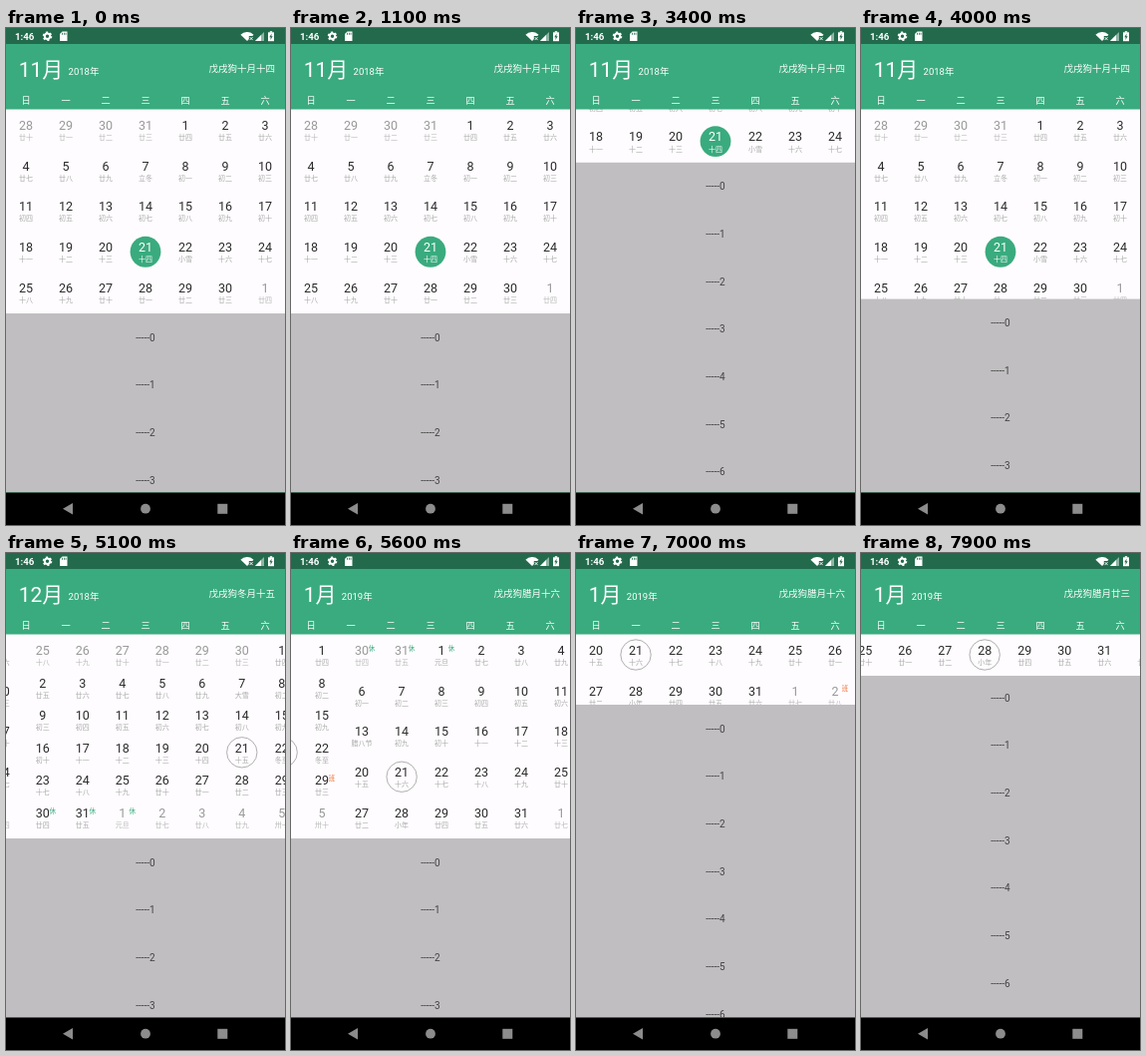
An HTML page with a canvas for the animation above (8000 ms loop, 280 px wide and 498 px high).

```html
<!DOCTYPE html>
<html lang="zh-CN">
<head>
<meta charset="utf-8">
<title>日历</title>
<style>
html, body { margin: 0; width: 100%; height: 100%; overflow: hidden; background: #000; }
canvas { display: block; width: 280px; height: 498px; }
</style>
</head>
<body>
<canvas id="stage"></canvas>
<script>
const W = 280, H = 498, LOOP = 8000, STEP = 100, DAY = 864e5;
const GREEN = '#3aab7e', TOP = 81.5, ROW = 97.4, PITCH = 40.75, FOLD = 4 * PITCH, END = 465;
const FONT = 'Roboto, "Noto Sans CJK SC", "Noto Sans CJK", sans-serif';
const canvas = document.getElementById('stage');
const c = canvas.getContext('2d');
const dpr = window.devicePixelRatio || 1;
canvas.width = W * dpr;
canvas.height = H * dpr;

// Days are counted from Sunday, 28 October 2018.
const EPOCH = Date.UTC(2018, 9, 28);
const TODAY = 24;
const LUNAR = [[70, '腊月'], [40, '冬月'], [11, '十月'], [-19, '九月']];
const FEASTS = { 10: '立冬', 25: '小雪', 40: '大雪', 55: '冬至', 65: '元旦', 77: '腊八节', 92: '小年' };
const MARKS = { 62: '班', 63: '休', 64: '休', 65: '休', 97: '班' };

function monthPage(i) {
  const date = new Date(Date.UTC(2018, 10 + i, 1));
  const start = (date - EPOCH) / DAY;
  const days = (Date.UTC(2018, 11 + i, 1) - date) / DAY;
  const month = date.getUTCMonth();
  return {
    month,
    title: month + 1 + '月',
    year: date.getUTCFullYear() + '年',
    first: start - start % 7,
    rows: Math.ceil((start % 7 + days) / 7),
    pick: start + 20
  };
}
const MONTHS = [0, 1, 2].map(monthPage);

// Progress from 0 to 1 between two times
const part = (t, a, b) => Math.min(1, Math.max(0, (t - a) / (b - a)));
const out = (t, a, b) => 1 - (1 - part(t, a, b)) ** 2;
const smooth = (t, a, b) => { const u = part(t, a, b); return u * u * (3 - 2 * u); };

function pose(t) {
  const rest = 71.5;
  return {
    fold: FOLD * (out(t, 1600, 2700) - smooth(t, 3250, 4170))
      + rest * out(t, 6100, 6400) + (FOLD - rest) * smooth(t, 6500, 7300),
    scroll: 26 * (out(t, 2800, 3100) - part(t, 3300, 3400)) + 2 * part(t, 7200, 7300),
    page: W * (smooth(t, 4700, 5170) + smooth(t, 5200, 5750)),
    week: W * smooth(t, 7600, 8035),
    opening: t > 2800 && t < 4500
  };
}

function rect(x, y, w, h, color) {
  c.fillStyle = color;
  c.fillRect(x, y, w, h);
}

function poly(color, ...pts) {
  c.fillStyle = color;
  c.beginPath();
  pts.forEach(p => c.lineTo(...p));
  c.fill();
}

function disc(x, y, r, color) {
  c.fillStyle = color;
  c.beginPath();
  c.arc(x, y, r, 0, 7);
  c.fill();
}

function ring(x, y, r, width, color) {
  c.strokeStyle = color;
  c.lineWidth = width;
  c.beginPath();
  c.arc(x, y, r, 0, 2 * Math.PI);
  c.stroke();
}

// Text centred vertically on y; returns its width.
function text(s, x, y, size, color, align = 'center', weight = 400) {
  c.font = `${weight} ${size}px ${FONT}`;
  c.textAlign = align;
  c.fillStyle = color;
  c.fillText(s, x, y + size * 0.36);
  return c.measureText(s).width;
}

function lunar(n) {
  const [start, month] = LUNAR.find(l => n >= l[0]);
  const d = n - start + 1;
  const day = (d < 11 ? '初' : '初十廿卅'[Math.floor(d / 10)]) + '十一二三四五六七八九'[d % 10];
  return { month, day };
}

function drawDay(n, x, y, month, pick) {
  const date = new Date(EPOCH + n * DAY);
  const own = date.getUTCMonth() === month;
  const solid = n === pick && n === TODAY;
  if (solid) disc(x, y + 4.6, 15.4, GREEN);
  else if (n === pick) ring(x, y + 4.6, 15.2, 0.9, '#a8a8a8');
  text(date.getUTCDate(), x, y, 12.5, solid ? '#fff' : own ? '#2b2b2b' : '#999');
  text(FEASTS[n] || lunar(n).day, x, y + 12, 7, solid ? '#fff' : own ? '#aaa' : '#b8b8b8');
  const mark = MARKS[n];
  if (mark) text(mark, x + 9.9, y - 2, 6.5, mark === '休' ? GREEN : '#f0763c');
}

function drawWeek(first, x, y, month, pick) {
  for (let i = 0; i < 7; i++) drawDay(first + i, x + 20 + i * 40, y, month, pick);
}

function drawMonth(m, x, shift) {
  for (let r = 0; r < m.rows; r++)
    drawWeek(m.first + r * 7, x, ROW + r * FOLD / (m.rows - 1) - shift, m.month, m.pick);
}

function drawList(top, scroll) {
  c.save();
  c.beginPath();
  c.rect(0, top, W, END - top);
  c.clip();
  rect(0, top, W, H, '#c0bec0');
  for (let i = 0; i < 9; i++) text('-----' + i, 140, top + 24 + i * 47.7 - scroll, 10, '#434343');
  c.restore();
}

function drawHeader(m, pick) {
  rect(0, 0, W, TOP, GREEN);
  const w = text(m.title, 12.7, 41, 21, '#fff', 'left');
  text(m.year, w + 18, 44, 9.5, '#fff', 'left');
  const l = lunar(pick);
  text('戊戌狗' + l.month + l.day, 270, 41, 9.5, '#fff', 'right');
  [...'日一二三四五六'].forEach((s, i) => text(s, 20 + i * 40, 72.7, 9.2, '#fff', 'center', 500));
}

function drawStatus() {
  const bar = '#236a4d';
  rect(0, 0, W, 16, bar);
  text('1:46', 9, 8.3, 9.7, '#fff', 'left', 700);
  // gear
  c.setLineDash([2.1, 2.1]);
  ring(41.5, 8.2, 4, 1.6, '#fff');
  c.setLineDash([]);
  ring(41.5, 8.2, 2.7, 2, '#fff');
  // memory card
  poly('#fff', [54, 6], [56.5, 3.5], [61.5, 3.5], [61.5, 13], [54, 13]);
  for (let i = 0; i < 3; i++) rect(56.2 + i * 1.7, 4.8, 0.8, 2, bar);
  // wifi without connection
  c.fillStyle = '#fff';
  c.beginPath();
  c.moveTo(242, 13);
  c.arc(242, 13, 9, -Math.PI * 0.76, -Math.PI * 0.24);
  c.fill();
  rect(243.8, 8, 5, 5.5, bar);
  text('×', 246.2, 10.6, 8, '#fff');
  // signal
  poly('#8fb5a5', [250, 13], [259, 4], [259, 13]);
  poly('#fff', [250, 13], [256, 7], [256, 13]);
  // battery
  rect(263, 4.3, 6, 8.9, '#fff');
  rect(264.8, 3.2, 2.4, 1.5, '#fff');
  poly(bar, [266.6, 5.5], [264.3, 9.3], [265.7, 9.3], [265.4, 12], [267.7, 8.2], [266.3, 8.2]);
}

function drawNav() {
  const grey = '#8c8c8c';
  rect(0, END, W, 1, '#3a5f4f');
  rect(0, END + 1, W, H, '#000');
  poly(grey, [57, 481.7], [67, 476], [67, 487.4]);
  disc(140, 481.7, 4.9, grey);
  rect(212.3, 476.8, 10, 10, grey);
}

function draw(t) {
  c.setTransform(dpr, 0, 0, dpr, 0, 0);
  rect(0, 0, W, H, '#fefcfe');
  const { fold, scroll, page, week, opening } = pose(t);
  const m = MONTHS[Math.round(page / W)];
  // The month stops at the chosen row; the list covers or reveals the rest.
  const shift = opening ? Math.max(0, fold - PITCH) : Math.min(3 * PITCH, fold);
  let pick = m.pick;
  if (week) {
    const first = pick - pick % 7;
    pick += 7;
    for (let i = 0; i < 2; i++) drawWeek(first + i * 7, i * W - week, ROW, m.month, pick);
  } else {
    MONTHS.forEach((p, i) => {
      const x = i * W - page;
      if (Math.abs(x) < W) drawMonth(p, x, shift);
    });
  }
  drawList(286 - fold, scroll);
  drawHeader(m, pick);
  drawStatus();
  drawNav();
}

const begin = performance.now();
function tick() {
  const t = (performance.now() - begin) % LOOP;
  draw(Math.floor(t / STEP) * STEP);
  requestAnimationFrame(tick);
}
tick();
</script>
</body>
</html>
```
